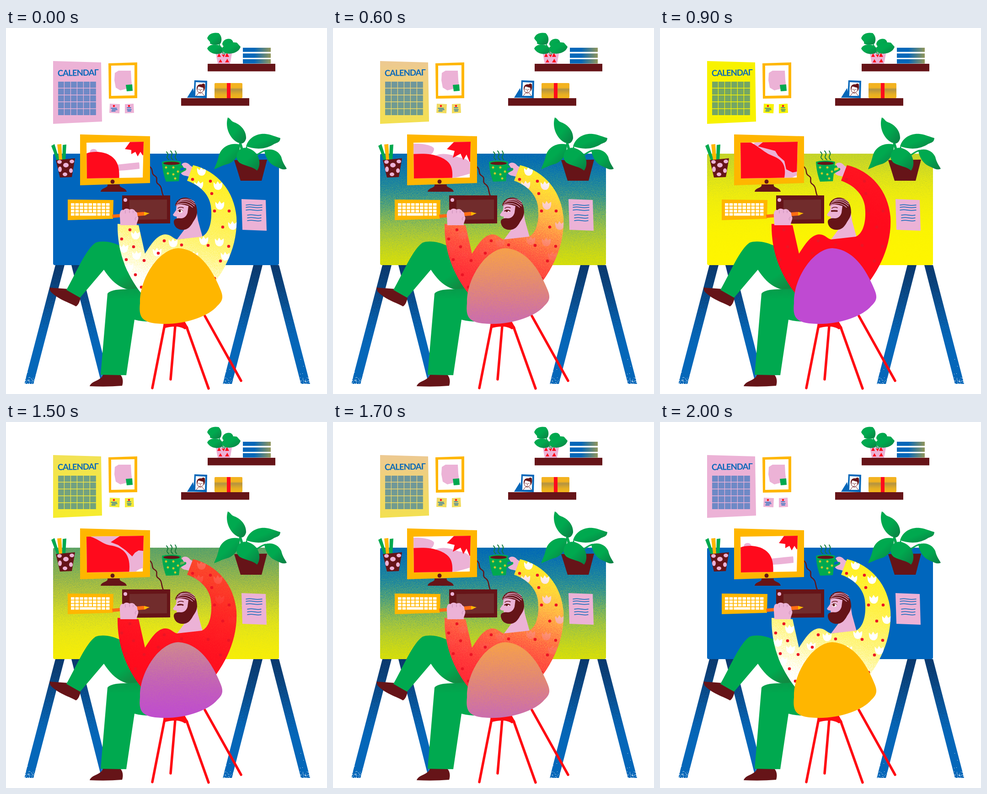
Animation, 702 px wide and 798 px high, one loop 4.8 s. Source, as an HTML page:

```html
<!DOCTYPE html>
<html lang="en">
<head>
<meta charset="utf-8">
<title>At the desk</title>
<style>
html, body { margin: 0; width: 100%; height: 100%; overflow: hidden; background: #fff; }
svg { display: block; width: 100vw; height: 100vh; }
.brown { fill: #661418; } .green { fill: #00a94f; } .gold { fill: #ffb600; }
.pink { fill: #ecb2d6; } .red { fill: #ff0a1c; } .blue { fill: #0567b9; } .white { fill: #fff; }
.line { fill: none; stroke-linecap: round; stroke-linejoin: round; }
.leaf { fill: url(#leaf); }
</style>
</head>
<body>
<svg viewBox="0 0 702 798" xmlns="http://www.w3.org/2000/svg">
<defs>
  <filter id="grain" filterUnits="userSpaceOnUse" x="0" y="0" width="702" height="798" color-interpolation-filters="sRGB">
    <feTurbulence type="fractalNoise" baseFrequency=".85" numOctaves="2" seed="4" result="n"/>
    <feDisplacementMap in="SourceGraphic" in2="n" scale="170" xChannelSelector="R" yChannelSelector="G"/>
  </filter>
  <linearGradient id="paper" gradientUnits="userSpaceOnUse" x1="0" y1="72" x2="0" y2="209"/>
  <linearGradient id="desk" gradientUnits="userSpaceOnUse" x1="0" y1="274" x2="0" y2="517"/>
  <linearGradient id="shirt" gradientUnits="userSpaceOnUse" x1="430" y1="310" x2="350" y2="560"/>
  <linearGradient id="tulip" gradientUnits="userSpaceOnUse" x1="430" y1="310" x2="350" y2="560"/>
  <linearGradient id="chair" gradientUnits="userSpaceOnUse" x1="0" y1="480" x2="0" y2="645"/>
  <linearGradient id="legs" gradientUnits="userSpaceOnUse" x1="0" y1="517" x2="0" y2="670">
    <stop stop-color="#0a376b"/><stop offset=".35" stop-color="#0a4580"/><stop offset="1" stop-color="#0567b9"/>
  </linearGradient>
  <linearGradient id="leaf" x1=".2" y1=".2" x2="1" y2="1">
    <stop offset=".35" stop-color="#00a94f"/><stop offset="1" stop-color="#0b7d43"/>
  </linearGradient>
  <linearGradient id="thigh" gradientUnits="userSpaceOnUse" x1="235" y1="535" x2="262" y2="575">
    <stop offset=".3" stop-color="#00a94f"/><stop offset="1" stop-color="#128a42"/>
  </linearGradient>
  <linearGradient id="shin" gradientUnits="userSpaceOnUse" x1="0" y1="568" x2="0" y2="592">
    <stop stop-color="#069c4b"/><stop offset="1" stop-color="#00a94f"/>
  </linearGradient>
  <linearGradient id="book">
    <stop offset=".4" stop-color="#0567b9"/><stop offset="1" stop-color="#92965a"/>
  </linearGradient>
  <linearGradient id="gift" x2="0" y2="1">
    <stop offset=".3" stop-color="#f3b320"/><stop offset=".42" stop-color="#b39342"/><stop offset=".75" stop-color="#e6ae22"/><stop offset="1" stop-color="#f5b51a"/>
  </linearGradient>
  <clipPath id="deskClip"><rect x="103" y="274" width="494" height="243" rx="4"/></clipPath>
  <clipPath id="legsClip"><path d="M108 517H128L60 776H40ZM143 517H162L228 776H209ZM541 517H561L494 776H474ZM578 517H597L665 776H645Z"/></clipPath>
  <clipPath id="shirtClip"><path d="M244 427L290 430L304 492C318 470 330 452 347 450C360 449 365 459 374 461L428 455C445 448 452 420 448 388C444 362 423 342 396 333L409 299C463 312 499 356 504 412C507 465 487 512 460 550L400 600L297 580C265 540 243 490 244 427Z"/></clipPath>
  <clipPath id="chairClip"><path d="M377 480C332 482 291 550 293 600C290 628 296 640 326 644C380 650 440 632 462 606C475 594 476 586 468 568C452 530 425 483 377 480Z"/></clipPath>
  <clipPath id="screenClip"><path d="M176 250L301 248L299 326L177 328Z"/></clipPath>
</defs>

<!-- wall -->
<path fill="url(#paper)" d="M103 72L208 75L210 204L103 209Z"/>
<text x="113" y="105" transform="rotate(-1 113 105)" class="blue" font-family="Lato, 'Open Sans', sans-serif" font-weight="700" font-size="18.500" letter-spacing="-.9">CALENDAΓ</text>
<g id="days" class="blue" opacity=".54"></g>
<path class="gold" d="M224 77L287 75V153L225 154Z"/>
<path class="white" d="M230 82L281 81V147L230 148Z"/>
<path class="pink" d="M238 98L246 93L273 93L274 112L276 129L262 133L250 136L240 130L237 114Z"/>
<path class="green" d="M262 124L276 123L277 137L264 138Z"/>
<path fill="url(#paper)" d="M227 165L249 166L248 186L226 185ZM260 166L279 165L280 185L260 186Z"/>
<g class="red"><circle cx="236" cy="170" r="2.2"/><circle cx="269" cy="170" r="2.2"/></g>
<path class="line" stroke="#0567b9" stroke-width="1.5" d="M230 175h12M232 178h11M231 181h8M265 174h8M265 178h9M266 181h7"/>

<!-- shelves -->
<path class="brown" d="M441 78H589V94.500H441ZM383 153H532V169.500H383Z"/>
<path class="pink" d="M458 51H495L490 78H463Z"/>
<path class="red" d="M466 55l4 8h-8zM483 54l5 9h-9zM476 64l-4 -6h7zM469 68l4 7h-8zM484 67l4 8h-9z"/>
<path class="line" stroke="#00a94f" stroke-width="2" d="M465 32L475 56M486 37L478 57"/>
<g class="leaf">
  <path d="M440 22C444 12 453 9 465 11C472 17 473 27 469 34C462 38 451 37 446 34C448 29 442 28 440 22Z"/>
  <path d="M440 45C443 36 455 35 464 37C473 40 476 46 472 54C463 59 448 58 440 45Z"/>
  <path d="M473 34C475 26 483 22 491 24C499 28 498 36 491 40C481 43 473 41 473 34Z"/>
  <path d="M472 44C479 34 492 29 505 32L513 41C510 50 502 55 489 56C480 56 472 53 472 44Z"/>
</g>
<path fill="url(#book)" d="M518 43H579V52H518ZM518 55.500H579V65H518ZM518 68H579V77.500H518Z"/>
<path class="blue" d="M396 152L409 131L414 152Z"/>
<path class="blue" d="M412 114L440 115L439 153L410 152Z"/>
<path class="white" d="M415 118L436 119L435 148L414 148Z"/>
<path class="brown" d="M417 131C418 123 424 122 428 123C430 120 436 121 435 125C436 131 434 134 433 138L431 130C426 130 423 127 420 128L418 136Z"/>
<path class="line" stroke="#661418" stroke-width="1" d="M418 133C418 144 430 146 432 134M421 134h2M427 134h2M425 134v4M422 140q3 2 5 0M421 142L416 148M429 142L434 148"/>
<rect x="456" y="120" width="61" height="33" rx="2" fill="url(#gift)"/>
<path class="red" d="M483 120H491V153H483Z"/>

<!-- desk -->
<g clip-path="url(#legsClip)"><rect y="400" width="702" height="398" fill="url(#legs)" filter="url(#grain)"/></g>
<g clip-path="url(#deskClip)"><rect x="3" y="174" width="694" height="443" fill="url(#desk)" filter="url(#grain)"/></g>

<!-- pencil cup -->
<path class="green" d="M99 257L106 253L117 288H111ZM124 255L132 254L130 288H123Z"/>
<path class="gold" d="M112 254L121 253L123 288H116Z"/>
<path class="brown" d="M109 288L151 284L144 325L118 326Z"/>
<g class="pink">
  <ellipse cx="117" cy="292" rx="5" ry="4"/><ellipse cx="131" cy="299" rx="6" ry="5"/><ellipse cx="144" cy="291" rx="5" ry="4"/>
  <ellipse cx="118" cy="308" rx="4" ry="6"/><ellipse cx="142" cy="311" rx="4" ry="5"/><ellipse cx="129" cy="319" rx="5" ry="4"/>
</g>

<!-- monitor -->
<path class="line" stroke="#661418" stroke-width="2.500" d="M314 302C324 309 316 317 325 322C335 327 324 336 334 341C342 347 339 356 344 366"/>
<path class="brown" d="M222 341H249C246 349 262 347 264 357H207C209 347 224 350 222 341Z"/>
<path class="gold" d="M162 232L315 236V338L162 343Z"/>
<circle class="brown" cx="233" cy="335" r="4.500"/>
<g clip-path="url(#screenClip)">
  <path class="white" d="M170 240H310V335H170Z"/>
  <path class="pink" id="cloud"/><path class="pink" id="bar"/>
  <path class="red" id="hill"/><path class="red" id="star"/>
</g>

<!-- keyboard, tablet, paper -->
<path class="gold" d="M135 374L235 375L234 416L135 419Z"/>
<g id="keys" class="white"></g>
<path class="brown" d="M254 365H359V426L254 427Z"/>
<path fill="#712c2c" d="M270 375L352 374V417L270 418Z"/>
<circle class="pink" cx="261" cy="375" r="4"/>
<path class="pink" d="M515 373L568 375L570 442L517 440Z"/>
<path class="line" id="notes" stroke="#0567b9" stroke-width="1.400"/>

<!-- plant -->
<path class="line" stroke="#00a94f" stroke-width="3" d="M513 250L526 292M526 260L531 292M511 252L522 292M567 267Q545 275 538 292"/>
<path class="brown" d="M499 288L571 287L559 333H513Z"/>
<g class="leaf">
  <path d="M485 195C492 198 491 203 500 206C516 212 526 227 525 241C522 251 517 253 511 251C495 247 477 222 485 195Z"/>
  <path d="M525 258C530 240 548 229 568 231C583 233 588 237 600 240C599 251 592 249 583 255C563 266 543 264 525 258Z"/>
  <path d="M455 308C458 300 462 293 465 280C470 258 492 249 511 254C513 273 502 290 487 296C474 299 464 305 455 308Z"/>
  <path d="M514 263C505 269 499 284 511 294C525 302 540 302 549 311C557 300 555 286 549 276C541 265 527 258 514 263Z"/>
  <path d="M565 267C579 261 596 267 602 281C605 294 610 299 614 307C605 311 598 305 590 302C577 297 567 283 565 267Z"/>
</g>

<!-- mug -->
<path class="line" stroke="#127a3c" stroke-width="2" d="M351 270q5 5 2 9t3 8M360 268q5 5 2 10t3 9M370 268q4 6 1 10t2 9"/>
<path class="line" stroke="#00a94f" stroke-width="5" d="M379 304C392 297 398 308 389 312L378 315"/>
<path class="green" d="M341 292C350 288 375 288 383 292L378 334L350 335C345 322 342 308 341 292Z"/>
<ellipse class="brown" cx="362" cy="295" rx="18" ry="3.500"/>
<g fill="#c8c92b"><circle cx="350" cy="304" r="2.500"/><circle cx="366" cy="304" r="2.500"/><circle cx="376" cy="313" r="2.500"/><circle cx="354" cy="317" r="2.500"/><circle cx="366" cy="319" r="2.500"/><circle cx="370" cy="328" r="2.500"/></g>
<path class="pink" d="M384 297C390 291 398 293 403 300L408 303L400 324C392 322 383 321 383 316L390 312C396 310 396 304 389 305Z"/>

<!-- trousers and shoes -->
<path class="brown" d="M95 566L136 569L163 588C161 598 158 604 153 607C138 598 115 593 97 574Z"/>
<path fill="url(#thigh)" d="M132 571C150 541 174 482 196 468C214 462 236 468 252 476L300 590L273 571C247 568 229 550 214 527L162 588Z"/>
<path class="brown" d="M183 781C188 768 206 771 213 755L250 756C257 763 256 774 254 780Q220 783 183 781Z"/>
<path fill="url(#shin)" d="M222 579C232 567 262 571 290 568L330 640C312 641 296 640 281 636L263 757L207 756Z"/>

<!-- head -->
<path class="pink" d="M373 384L372 397L365 407Q366 411 373 411L374 420L392 437L374 461L430 456L420 420L414 382Z"/>
<path class="brown" d="M370 386C373 374 386 367 399 371C413 375 418 388 418 402C417 412 413 417 409 423C403 434 397 440 386 440C375 440 368 433 367 424C366 416 374 414 382 415C391 415 395 409 397 403L399 388C390 386 381 381 371 388Z"/>
<path class="line" stroke="#ecb2d6" stroke-width="1.200" d="M374 382Q393 371 412 388M377 378Q396 369 413 384M381 375Q399 369 412 379M372 386Q392 377 408 391"/>
<path class="line" stroke="#661418" stroke-width="1.600" d="M376 393Q381 389 388 392"/>
<ellipse class="white" id="eye" cx="381" cy="399" rx="5.500"/>
<ellipse class="brown" id="pupil" cx="380" cy="399" rx="2.600"/>
<path class="line" id="lid" stroke="#661418"/>

<!-- shirt -->
<g clip-path="url(#shirtClip)">
  <rect x="140" y="200" width="470" height="500" fill="url(#shirt)" filter="url(#grain)"/>
  <path id="tulips" fill="url(#tulip)"/>
  <g id="dots" fill="#ec1424"></g>
</g>

<!-- drawing hand -->
<path fill="#ff6b13" d="M232 407L300 401L306 402L307 408L301 409L233 414Z"/>
<path class="gold" d="M302 401L314 404L302 409Z"/>
<path class="pink" d="M250 430L249 411C248 400 252 395 257 397C261 392 268 394 270 396C276 393 281 396 283 400C289 402 286 408 289 412C291 418 285 424 286 430Z"/>
<path class="line" stroke="#c48bb4" stroke-width="1" d="M261 398v6M270 397v6M278 398v5M285 412q-4 2 -2 7"/>

<!-- chair -->
<g class="line" stroke="#ff0a12" stroke-width="5.500"><path d="M347 648L320 785M370 650L360 766M395 652L443 786M435 628L514 769"/></g>
<path fill="#ff0a12" d="M344 640H391L399 654L391 657C380 649 362 650 345 655Z"/>
<g clip-path="url(#chairClip)"><rect x="190" y="380" width="390" height="365" fill="url(#chair)" filter="url(#grain)"/></g>
</svg>

<script>
const $ = id => document.getElementById(id);
const LEVELS = [0, 1, 3, 5, 6];   // levels that the tables below describe

// Gradient stops along each axis, one row per level
const GRADIENTS = {
  paper: ['ecb2d6 ecb2d6', 'ecb2d6 ecb2d6', 'edc992 f3e050', 'f2e256 f6ec2c', 'f8f200 f8f200'],
  desk: [
    '0066bd 0066bd 0066bd 0066bd',
    '0066bd 0869b2 177a9a 469d68',
    '0067b6 258d97 a0c343 dae005',
    '56a069 a3ba45 e2e31a f8ee05',
    'bfd12c ecea10 fbf402 fff500'],
  shirt: [
    'fff01f fff14a fff582 ffffff',
    'fff01f fce84e fcd58b f8b0a8',
    'fff02a ffb748 ff5c42 ff2c36',
    'fa4a2c ff2724 ff1220 ff0a1c',
    'ff1420 ff0a1c ff0a1c ff0a1c'],
  tulip: [
    'ffffffff ffffffff ffffffff ffffffff',
    'ffffffff ffffffff fbd6dcff f9c4ccff',
    'ffffffff f9b9b8ff f9788030 ff404000',
    'ff7a6aa0 ff404030 ff202000 ff0a1c00',
    'ff0a1c00 ff0a1c00 ff0a1c00 ff0a1c00'],
  chair: [
    'ffb600 ffb600 ffb600',
    'ffb600 ffb414 f9b048',
    'f7a148 e18776 c96bb2',
    'd08a8c c363b4 bf4bd0',
    'bf4ad2 bf4ad2 bf4ad2']
};
const EYE = [4.2, 3.4, 2.2, 1, 0.3];

// Artwork growing on the monitor
const SHAPES = {
  hill: [
    'M170 276C185 268 210 268 226 277S250 300 247 335L170 335Z',
    'M170 277C190 271 212 270 229 279S256 300 253 335L170 335Z',
    'M170 275C190 274 214 272 236 282S264 305 260 335L170 335Z',
    'M170 248C195 247 208 266 228 269S278 282 268 335L170 335Z',
    'M170 242C200 242 222 268 240 276S282 290 270 335L170 335Z'],
  star: [
    'M260 264L273 246L305 246L305 270L299 278L294 270L288 280L283 270L274 275L274 266Z',
    'M257 266L270 246L305 246L305 273L299 283L293 272L287 281L282 271L271 279L272 267Z',
    'M249 264L267 246L305 246L305 278L299 293L292 276L285 288L279 274L262 283L266 268Z',
    'M229 262L256 244L305 244L305 285L300 281L290 280L282 285L276 293L262 280L245 268Z',
    'M214 258L236 240L305 240L305 309L300 313L290 315L276 308L272 290L258 278L252 268Z'],
  cloud: [
    'M183 272C183 261 200 261 200 272C200 284 183 284 183 272Z',
    'M166 270C166 256 206 256 206 272C206 284 166 284 166 270Z',
    'M160 262C160 245 222 253 221 264C218 290 160 290 160 262Z',
    'M184 256C190 236 262 240 258 256C246 290 190 285 184 256Z',
    'M205 252C210 244 262 244 258 264C250 285 212 270 205 252Z'],
  bar: [
    'M230 300C250 297 270 295 291 293C292 297 292 304 292 307C275 309 255 311 235 312Z',
    'M225 296C245 290 270 289 290 290C302 293 303 309 295 314C275 318 255 318 235 318Z',
    'M215 285C232 268 255 275 275 282C305 285 305 305 301 317C285 322 270 326 250 330Z',
    'M215 270C235 262 270 270 305 278C305 290 305 308 302 318C290 320 285 324 276 335Z',
    'M225 262C240 262 280 270 305 278C305 290 305 308 304 319C295 324 285 326 276 335Z']
};

const mix = (a, b, k) => a + (b - a) * k;
const mixPath = (a, b, k) => {
  const to = b.match(/[\d.]+/g);
  let i = 0;
  return a.replace(/[\d.]+/g, n => mix(+n, +to[i++], k).toFixed(1));
};
const mixHex = (a, b, k) => a.replace(/../g, (n, i) =>
  Math.round(mix(parseInt(n, 16), parseInt(b.substr(i, 2), 16), k)).toString(16).padStart(2, '0'));

// Repeated parts
const rect = (x, y, w, h) => `<rect x="${x}" y="${y}" width="${w}" height="${h}"/>`;
let days = '', keys = '', lines = '';
for (let r = 0; r < 5; r++)
  for (let c = 0; c < 6; c++) days += rect(114 + c * 14, 117 + r * 14.9, 12.8, 13.4);
for (let r = 0; r < 4; r++)
  for (let c = 0; c < 9; c++)
    if (r < 3 || c < 2 || c > 5) keys += rect(142 + c * 9.6, 382 + r * 7.2, 7.6, 5.6);
keys += rect(161.2, 403.6, 36.4, 5.6);
[386, 391, 397, 408, 414, 420].forEach((y, i) => {
  lines += `M${i < 3 ? 525 : 528} ${y}q8 -1.5 16 0t${i < 3 ? 19 : 14} 0`;
});
$('days').innerHTML = days;
$('keys').innerHTML = keys;
$('notes').setAttribute('d', lines);

const TULIPS = [[427, 313], [421, 343], [463, 344], [467, 387], [495, 431], [466, 467], [479, 498], [410, 497],
  [365, 469], [330, 489], [283, 452], [257, 481], [285, 496], [268, 522], [432, 464]];
$('tulips').setAttribute('d', TULIPS.map(([x, y]) =>
  `M${x - 9} ${y - 8}l5 5l4 -7l4 6l6 -4c1 10 -2 17 -9 17c-8 0 -11 -8 -10 -17z`).join(''));

const DOTS = [[408, 330], [447, 334], [450, 361], [456, 399], [488, 399], [474, 434], [442, 474], [487, 476],
  [384, 473], [346, 464], [469, 508], [456, 546], [333, 491], [302, 507], [279, 477], [253, 460], [271, 440],
  [263, 505], [283, 538], [296, 565]];
$('dots').innerHTML = DOTS.map(([x, y]) => `<circle cx="${x}" cy="${y}" r="3.3"/>`).join('');

for (const id in GRADIENTS) {
  const n = GRADIENTS[id][0].split(' ').length;
  for (let i = 0; i < n; i++) {
    const stop = document.createElementNS('http://www.w3.org/2000/svg', 'stop');
    stop.setAttribute('offset', i / (n - 1));
    $(id).append(stop);
  }
}

function pose(level) {
  const j = Math.max(1, LEVELS.findIndex(l => l >= level));
  const k = (level - LEVELS[j - 1]) / (LEVELS[j] - LEVELS[j - 1]);
  const at = (rows, fn) => fn(rows[j - 1], rows[j], k);

  for (const id in GRADIENTS) {
    const [a, b] = [GRADIENTS[id][j - 1].split(' '), GRADIENTS[id][j].split(' ')];
    [...$(id).children].forEach((stop, i) => stop.setAttribute('stop-color', '#' + mixHex(a[i], b[i], k)));
  }
  for (const id in SHAPES) $(id).setAttribute('d', at(SHAPES[id], mixPath));

  const open = at(EYE, mix);
  $('eye').setAttribute('ry', open);
  $('pupil').setAttribute('ry', Math.min(2.8, open));
  $('lid').setAttribute('d', `M375.500 399Q381 ${399 - open * 1.8} 387 399`);
  $('lid').setAttribute('stroke-width', mix(3.6, 1, open / 4.2));
}

function levelAt(t) {
  if (t < 400) return 0;
  if (t < 900) return 1 + Math.floor((t - 400) / 100);
  if (t < 1500) return 6;
  if (t < 2000) return 5 - Math.floor((t - 1500) / 100);
  return 0;
}

const start = performance.now();
let shown = -1;
function tick() {
  const level = levelAt((performance.now() - start) % 4800);
  if (level !== shown) pose(shown = level);
  requestAnimationFrame(tick);
}
tick();
</script>
</body>
</html>
```
